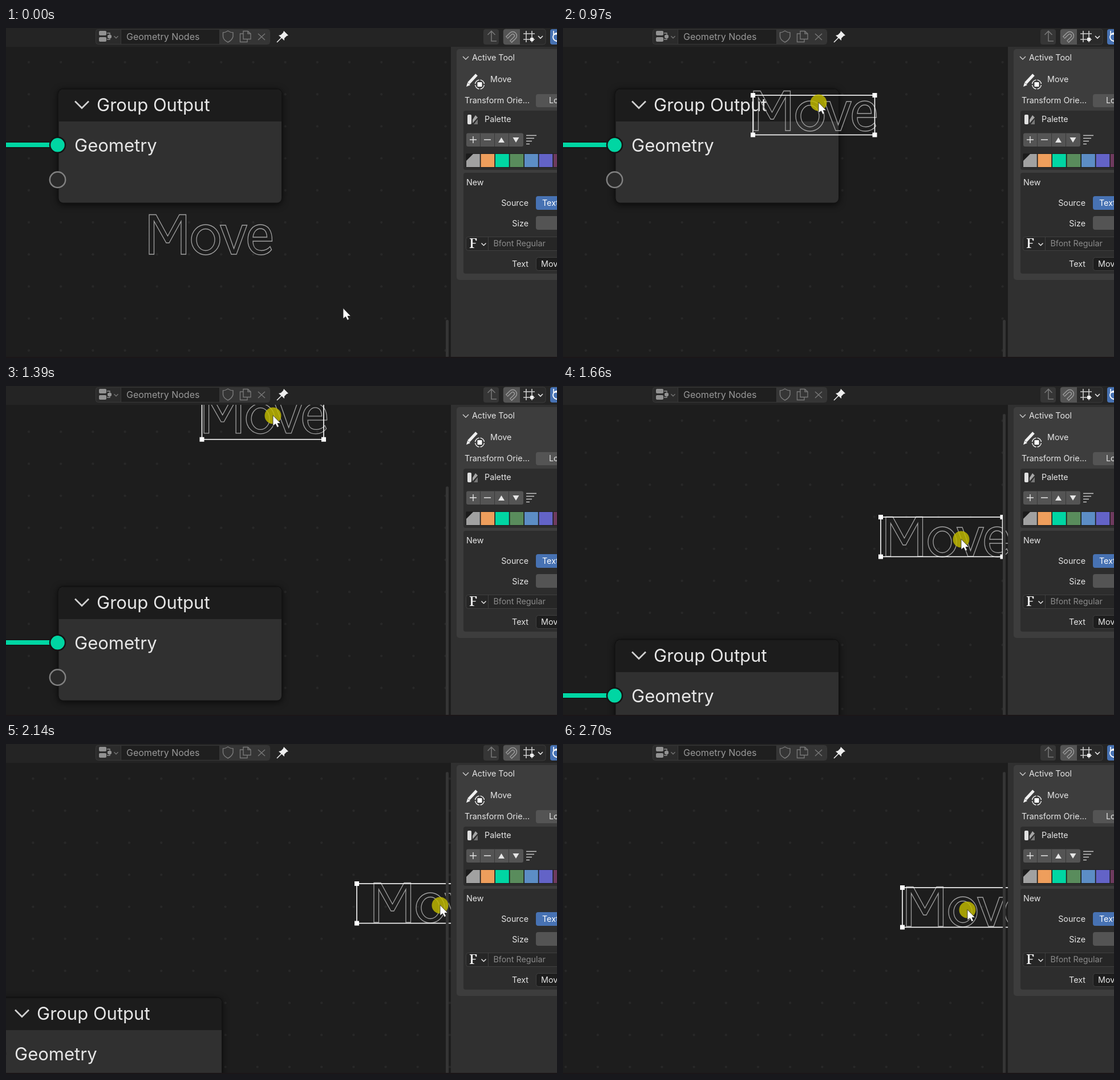
An HTML page with a canvas that plays this animation: 966 px wide and 579 px high, repeating every 2770 ms.

```html
<!DOCTYPE html>
<html lang="en">
<head>
<meta charset="utf-8">
<title>Moving a text annotation</title>
<style>
  html, body { margin: 0; width: 100%; height: 100%; overflow: hidden; background: #1d1d1d; }
  canvas { display: block; }
</style>
</head>
<body>
<canvas id="stage" width="966" height="579"></canvas>
<script>
const c = document.getElementById('stage').getContext('2d');
const LOOP = 2770, STEPS = 40, GRAB = 10;
const WHITE = '#e6e6e6', GREEN = '#00d6a3', BUTTON = '#545454', BLUE = '#4772b3';

// Tracks: [step, x, y], 40 steps per loop
const cursorTrack = [
  [0, 591, 492], [8, 372, 365], [10, 372, 365], [12, 440, 262], [14, 448, 131],
  [16, 439, 64], [18, 429, 35], [20, 468, 52], [22, 592, 165], [24, 698, 269],
  [26, 746, 281], [28, 765, 283], [31, 761, 283], [34, 763, 285], [37, 742, 289], [39, 709, 291]
];
const panTrack = [
  [16, 0, 0], [18, 0, 117], [20, 0, 245], [22, 0, 338], [29, 0, 338],
  [31, -105, 338], [34, -330, 338], [38, -541, 338]
];
const textOffset = [
  [10, -122, -38], [14, -115, -21], [18, -117, -38], [24, -133, -40], [31, -117, -40], [39, -108, -41]
];
const boxOffset = [
  [10, -121, -37], [14, -115, -13], [18, -118, -21], [24, -141, -39], [31, -146, -38], [39, -114, -39]
];

// Monotone cubic interpolation, at rest at both ends
function sample(track, t) {
  const last = track.length - 1;
  if (t <= track[0][0]) return track[0].slice(1);
  if (t >= track[last][0]) return track[last].slice(1);
  const i = track.findIndex(p => p[0] > t) - 1;
  const slope = (k, a) => (track[k + 1][a] - track[k][a]) / (track[k + 1][0] - track[k][0]);
  const tangent = (k, a) => {
    if (k === 0 || k === last) return 0;
    const p = slope(k - 1, a), q = slope(k, a);
    return p * q <= 0 ? 0 : 2 * p * q / (p + q);
  };
  const span = track[i + 1][0] - track[i][0], u = (t - track[i][0]) / span, v = 1 - u;
  return [1, 2].map(a =>
    track[i][a] * (1 + 2 * u) * v * v + track[i + 1][a] * (3 - 2 * u) * u * u +
    span * u * v * (tangent(i, a) * v - tangent(i + 1, a) * u));
}

function box(x, y, w, h, r, fill, stroke) {
  c.beginPath();
  c.roundRect(x, y, w, h, r);
  if (fill) { c.fillStyle = fill; c.fill(); }
  if (stroke) { c.strokeStyle = stroke; c.lineWidth = 1; c.stroke(); }
}
function path(d, fill, stroke, width = 1.5) {
  const p = new Path2D(d);
  if (fill) { c.fillStyle = fill; c.fill(p); }
  if (stroke) { c.strokeStyle = stroke; c.lineWidth = width; c.stroke(p); }
}
function circle(x, y, r, fill, stroke, width) {
  c.beginPath();
  c.arc(x, y, r, 0, 7);
  if (fill) { c.fillStyle = fill; c.fill(); }
  if (stroke) { c.strokeStyle = stroke; c.lineWidth = width; c.stroke(); }
}
// y is the middle of the capitals
function label(s, x, y, size = 14.3, color = WHITE, align = 'left', font = 'Inter, sans-serif') {
  c.font = `${size}px ${font}`;
  c.textAlign = align;
  c.fillStyle = color;
  c.fillText(s, x, y + size * .364);
}
const chevron = (x, y, r, color, width) =>
  path(`M${x - r} ${y - r / 2}L${x} ${y + r / 2}L${x + r} ${y - r / 2}`, null, color, width);

function drawGrid([px, py]) {
  const gap = 56.2, wrap = v => ((v % gap) + gap) % gap;
  c.fillStyle = '#282828';
  for (let x = wrap(40 + px); x < 784; x += gap)
    for (let y = wrap(60 + py); y < 582; y += gap) {
      c.beginPath();
      c.arc(x, y, 2.2, 0, 7);
      c.fill();
    }
}

function drawNode([px, py]) {
  c.save();
  c.translate(px, py);
  c.save();
  c.shadowColor = 'rgba(0,0,0,.65)';
  c.shadowBlur = 12;
  c.shadowOffsetY = 3;
  box(90.5, 105.5, 394, 202, 10, '#131313');
  c.restore();
  box(92.5, 108, 390.5, 198.5, 8, '#303030');
  box(92.5, 108, 390.5, 56, [8, 8, 0, 0], '#1c1c1c');
  path('M-20 205H90', null, '#141414', 11);
  path('M-20 205H90', null, GREEN, 8);
  circle(90.5, 205.3, 13.5, GREEN, '#141414', 2.5);
  circle(90.5, 266.3, 13.7, '#2a2a2a', '#818181', 2.5);
  chevron(133, 134.5, 12, '#d0d0d0', 2.8);
  label('Group Output', 159, 135, 31);
  label('Geometry', 120, 206, 31);
  c.restore();
}

function drawWord([x, y]) {
  c.save();
  c.translate(x, y);
  path('M1 .5H13L33.5 38L54 .5H65.5V70H57V12L36 50H31L9.5 12V70H1Z' +
    'M75 44.5a25 26.5 0 1 0 50 0a25 26.5 0 1 0 -50 0Z M84 44.5a16 19 0 1 0 32 0a16 19 0 1 0 -32 0Z' +
    'M125.500 19H135L149.500 60L164 19H172.500L154 70H145Z' +
    'M216.500 47H183C183 58 189 63.500 198 63.500C204 63.500 209 61 213 56.500L215.500 62C211 68 205 71 197 71' +
    'C183 71 174 60 174 45C174 29 183 18 196 18C209 18 217 28 216.500 47Z' +
    'M183 40H207.500C207 30 203 25 196 25C189 25 184 31 183 40Z', null, '#a2a2a2', 1.3);
  c.restore();
}

function drawFrame([x, y], handles) {
  c.strokeStyle = '#fff';
  c.lineWidth = 1.6;
  c.strokeRect(x, y, 213.5, 69.5);
  if (!handles) return;
  c.fillStyle = '#fff';
  for (const dx of [0, 213.5]) for (const dy of [0, 69.5]) c.fillRect(x + dx - 4, y + dy - 4, 8, 8);
}

function drawHeader() {
  const dim = '#777';
  c.fillStyle = '#242424';
  c.fillRect(0, 0, 966, 33);
  box(157.5, 2.5, 305, 26, 4, '#2b2b2b', '#393939');
  box(375, 3, 87, 25, [0, 4, 4, 0], '#353535');
  box(202, 3, 172, 25, 0, '#1f1f1f');
  path('M201.500 3V28M374.500 3V28', null, '#393939', 1);
  box(163, 5, 13, 8, 2, '#929292');
  box(163, 16, 13, 8, 2, '#929292');
  path('M177 9H182V12M177 20H182V18', null, '#929292', 1.3);
  box(178, 12, 7, 6, 2, '#929292');
  chevron(193, 16, 3.5, dim, 1.3);
  label('Geometry Nodes', 211, 15.5, 16, '#999');
  path('M389 5C386 7 383 8 380.500 8V15C381 20 385 23 389 25C393 23 397 20 398 15V8C395 8 392 7 389 5Z', null, dim, 1.5);
  path('M416 5.500H424L429 10V19.500H416ZM424 5.500V10H429M416 10H410.500V24.500H423V20', null, dim, 1.4);
  path('M442 10L454 21M454 10L442 21', null, dim, 1.5);
  path('M487 5L495 13L492 14L488 18L488 22L478 13L482 12L486 8Z', '#eee');
  path('M483 17L475 25', null, '#eee', 1.6);

  box(837, 2, 27, 27, 4, '#363636');
  path('M851 6V23H860M844.500 12L851 5.500L857.500 12', null, dim, 1.6);
  box(872, 2, 74, 27, 4, '#2a2a2a', '#3b3b3b');
  box(872, 2, 29, 27, [4, 0, 0, 4], BUTTON);
  c.save();
  c.translate(887, 15);
  c.rotate(.8);
  path('M-5 8V-2A5 5 0 0 1 5 -2V8', null, '#9a9a9a', 5.5);
  path('M-5 7V-2A5 5 0 0 1 5 -2V7', null, BUTTON, 2.5);
  c.restore();
  path('M912 5V25M922 5V25M907 10H927M907 20H927', null, '#cfcfcf', 1.6);
  box(919, 17, 6, 6, 1, '#eee');
  chevron(937, 16, 4, WHITE, 1.6);
  box(954, 2, 20, 27, 4, BLUE);
  circle(966, 16, 7, null, '#fff', 1.8);
  path('M960 5V11H966', null, '#fff', 1.6);
}

function drawSidebar() {
  c.fillStyle = '#303030';
  c.fillRect(780, 33, 186, 546);
  box(790, 37, 190, 405, 5, '#3d3d3d');
  chevron(806, 52.5, 5, '#cfcfcf', 1.4);
  label('Active Tool', 817, 51.5);
  path('M811 97L825 82', null, '#f0f0f0', 5);
  path('M807 103L809 96L814 100Z', '#f0f0f0');
  circle(830.5, 99, 8, '#3d3d3d', '#eee', 1.4);
  box(826.5, 95, 8, 8, 1, '#fff');
  path('M830.500 89V93M830.500 105V109M820.500 99H824.500M836.500 99H840.500', null, '#3d3d3d', 2);
  label('Move', 849, 90);
  label('Transform Orie...', 804, 127);
  box(929, 116, 60, 23, 4, BUTTON);
  label('Local', 952, 127);

  box(802, 145, 190, 104, 4, '#2d2d2d');
  box(809, 152, 7, 17, 2, '#e0e0e0');
  path('M818 161L823 153L827 157L818 167Z', '#a5a5a5');
  path('M820 169L827 160V169Z', '#777');
  label('Palette', 839, 160);
  box(807, 184.5, 100, 23.5, 3, BUTTON);
  path('M831.500 185V208M856.500 185V208M881.500 185V208', null, '#393939', 1);
  path('M813 196H825M819 190V202M838 196H850', null, WHITE, 1.4);
  path('M863 201L868.500 192L874 201ZM888.500 192H899.500L894 201Z', WHITE);
  path('M912 188.500H930M912 193.500H926M912 198.500H922M912 203.500H918', null, '#c8c8c8', 1.5);
  box(806, 220, 180, 25, 2, '#1f1f1f');
  ['#a1a1a1', '#ee9e5c', GREEN, '#598c5c', '#5c8dc5', '#6363c7', '#6e3a5e'].forEach((color, i) => {
    c.fillStyle = color;
    c.fillRect(807 + i * 25.5, 221, 23.8, 23);
  });
  path('M807 221H819L807 233Z', '#1b1b1b');

  box(802, 254, 190, 177, 4, '#2d2d2d');
  label('New', 807, 271);
  label('Source', 916, 307, 14.3, WHITE, 'right');
  box(929, 295, 60, 24, 4, BLUE);
  label('Text', 940, 307, 14.3, '#fff');
  label('Size', 916, 342.5, 14.3, WHITE, 'right');
  box(929, 330, 60, 24, 4, BUTTON);
  box(806.5, 366.5, 180, 24, 4, '#262626', '#404040');
  path('M845.500 367V390', null, '#404040', 1);
  label('F', 812, 378, 23, '#eee', 'left', 'bold 23px "Noto Serif", serif'.slice(10));
  label('F', 812.7, 378, 23, '#eee', 'left', '"Noto Serif", serif');
  chevron(837.5, 379.5, 4, WHITE, 1.5);
  label('Bfont Regular', 854.5, 378, 14.3, '#8b8b8b');
  label('Text', 916, 414, 14.3, WHITE, 'right');
  box(929.5, 402.5, 60, 23, 4, '#1d1d1d', '#404040');
  label('Move', 938, 414);
}

function drawCursor([x, y], pressed) {
  if (pressed) circle(x, y, 14.5, 'rgba(192,185,0,.83)');
  c.save();
  c.translate(x, y);
  path('M0 -.5V18L4.500 14.500L7.500 20.500L10.500 19L8 13.500H13.500Z', '#fff', '#222', .8);
  c.restore();
}

function draw(step) {
  const pan = sample(panTrack, step), cursor = sample(cursorTrack, step);
  const anchor = step < GRAB ? [372, 365] : cursor;
  const follow = track => sample(track, step).map((d, i) => anchor[i] + d);
  const frame = follow(boxOffset);
  const hover = cursor[0] > frame[0] && cursor[0] < frame[0] + 214 && cursor[1] < frame[1] + 70;

  c.fillStyle = '#1d1d1d';
  c.fillRect(0, 0, 966, 579);
  c.save();
  c.beginPath();
  c.rect(0, 33, 780, 546);
  c.clip();
  drawGrid(pan);
  drawNode(pan);
  drawWord(follow(textOffset));
  if (hover || step >= GRAB) drawFrame(frame, step > GRAB);
  box(771, 512 - 1.37 * pan[1], 5, 600, 2.5, '#353535');
  c.restore();
  drawHeader();
  drawSidebar();
  c.fillStyle = '#1b1618';
  c.fillRect(0, 577, 966, 2);
  drawCursor(cursor, step >= GRAB);
}

// The picture advances in whole steps; the margin absorbs timer rounding
function tick() {
  const t = performance.now() % LOOP;
  draw(Math.min(STEPS - 1, Math.floor((t + 8) / LOOP * STEPS)));
  requestAnimationFrame(tick);
}
tick();
</script>
</body>
</html>
```
